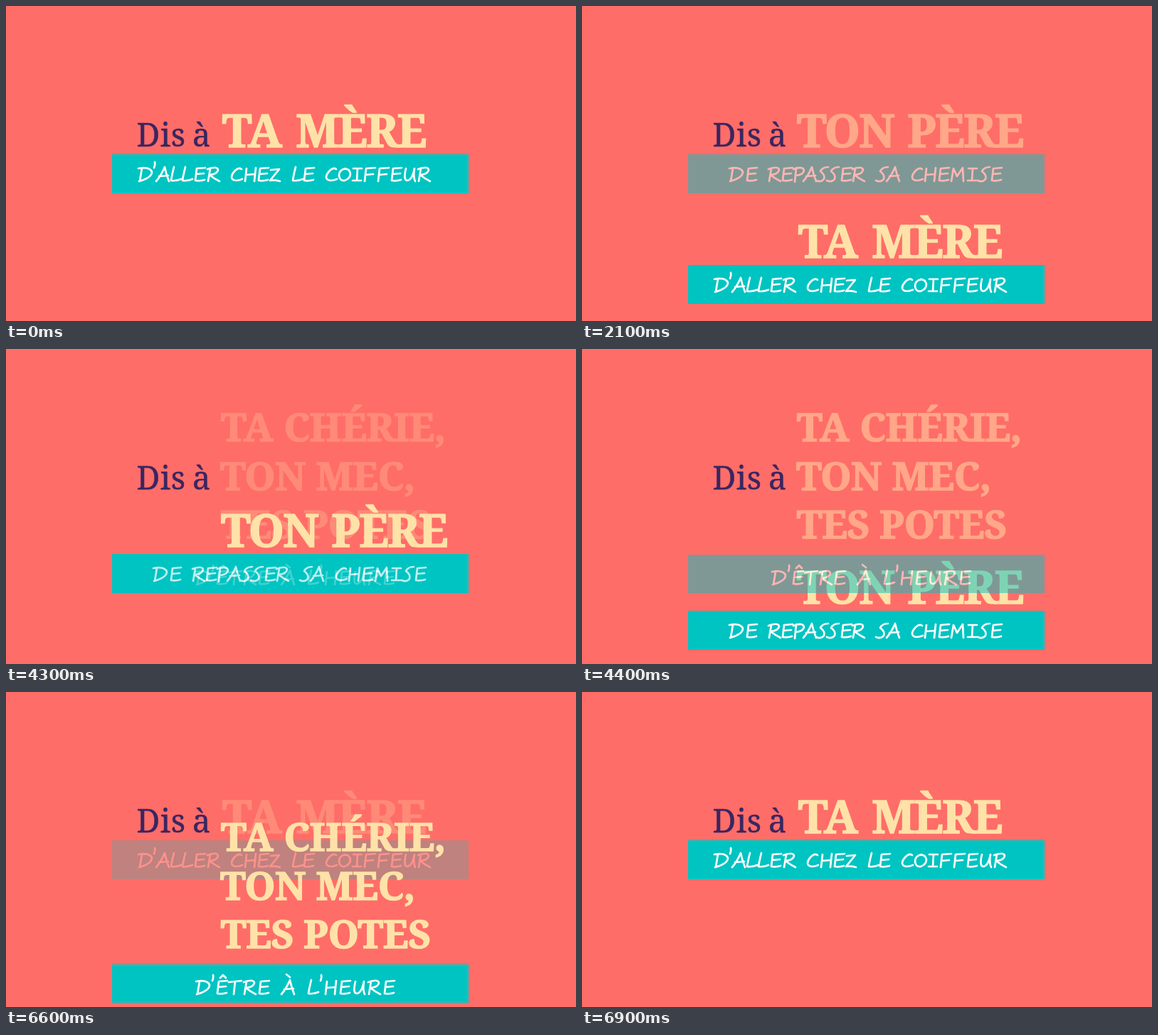
Recreate the animation shown at these times as an HTML page without scripts. Size 801 by 444 pixels, loop 7000 ms.

```html
<!DOCTYPE html>
<html lang="fr">
<head>
<meta charset="utf-8">
<title>Dis à…</title>
<style>
  html, body { margin: 0; width: 100%; height: 100%; overflow: hidden; background: #ff6d68; }
  svg { display: block; width: 801px; height: 444px; }
  text { font-family: "Noto Serif", serif; text-anchor: middle; }
  .lead { font-size: 45px; letter-spacing: .6px; fill: #3a2660; stroke: #3a2660; stroke-width: .5px; }
  .who { font-weight: 700; fill: #ffe2a8; stroke: #ffe2a8; stroke-width: 1.5px; }
  .big { font-size: 64px; letter-spacing: -1.8px; }
  .mid { font-size: 55px; letter-spacing: -.5px; }
  .band { fill: #00c4c2; }
  .hand { fill: none; stroke: #fff; stroke-width: 2.7px; stroke-linecap: round; stroke-linejoin: round; }

  /* each card fades in, holds, then drops off the stage in four steps */
  .card { animation: 7s step-end infinite; }
  #mother { --fall: 312px; animation-name: mother-fade, mother-drop; }
  #father { --fall: 320px; animation-name: father-fade, father-drop; }
  #friends { --fall: 376px; animation-name: friends-fade, friends-drop; }

  @keyframes mother-fade {
    0% { opacity: 1; }
    34.28% { opacity: 0; }
    94.28% { opacity: 0; animation-timing-function: steps(4, start); }
    100% { opacity: 1; }
  }
  @keyframes mother-drop {
    0% { transform: translateY(0); }
    28.57% { transform: translateY(0); animation-timing-function: steps(4, start); }
    34.28% { transform: translateY(var(--fall)); }
    34.3%, 100% { transform: translateY(0); }
  }
  @keyframes father-fade {
    0% { opacity: 0; }
    28.57% { opacity: 0; animation-timing-function: steps(4, start); }
    34.28% { opacity: 1; }
    67.14%, 100% { opacity: 0; }
  }
  @keyframes father-drop {
    0% { transform: translateY(0); }
    61.42% { transform: translateY(0); animation-timing-function: steps(4, start); }
    67.14% { transform: translateY(var(--fall)); }
    67.2%, 100% { transform: translateY(0); }
  }
  @keyframes friends-fade {
    0% { opacity: 0; }
    61.42% { opacity: 0; animation-timing-function: steps(4, start); }
    67.14%, 100% { opacity: 1; }
  }
  @keyframes friends-drop {
    0% { transform: translateY(0); }
    94.28% { transform: translateY(0); animation-timing-function: steps(4, start); }
    100% { transform: translateY(var(--fall)); }
  }
</style>
</head>
<body>
<svg viewBox="0 0 801 444" xmlns="http://www.w3.org/2000/svg">
  <defs>
    <!-- handwritten alphabet, baseline at 0 -->
    <path id="A" d="M0 0Q7-8 12-20Q14-10 18 0M4-7L17-8"/>
    <path id="C" d="M15-17Q11-20 5-14Q-1-7 2-3Q6 1 16-3"/>
    <path id="D" d="M5-18L2 0M0-18Q16-21 19-13Q19-5 1 0"/>
    <path id="E" d="M16-19L4-18L2-1Q9 0 15-2M3-10L14-11"/>
    <path id="F" d="M17-19L4-18L2 0M3-9L14-10"/>
    <path id="H" d="M3-18L1 0M16-19L14 0M2-9L15-10"/>
    <path id="I" d="M2-18L14-18M8-18L7-1M1-1L13-1"/>
    <path id="L" d="M5-20Q2-8 1-1Q8 0 15-3"/>
    <path id="M" d="M1 0L4-18L9-7L17-19L18 0"/>
    <path id="O" d="M10-18Q1-16 1-8Q2 0 9-1Q17-4 17-11Q15-19 7-17"/>
    <path id="P" d="M4-19L2 1M0-17Q14-22 15-15Q14-9 3-8"/>
    <path id="R" d="M4-18L1 0M0-17Q14-22 15-16Q14-10 3-9Q9-4 17 0"/>
    <path id="S" d="M16-20Q8-20 5-14Q12-9 10-3Q6 2-1-1"/>
    <path id="T" d="M0-17L18-19M9-18L7 0"/>
    <path id="U" d="M3-18Q-1-1 5-1Q12-2 15-18Q13-6 16 0"/>
    <path id="Z" d="M2-16L14-17L1-1Q8-2 15 0"/>
    <path id="apos" d="M3-27Q4-24 2-19"/>
    <path id="hat" d="M5-23L9-27L13-23"/>
    <path id="grave" d="M7-28L12-24"/>
  </defs>

  <rect width="801" height="444" fill="#ff6d68"/>
  <g class="lead"><text x="218" y="197.5">Dis</text><text x="275" y="197.5">à</text></g>

  <g class="card" id="mother">
    <g class="who big"><text x="345" y="198.5">TA</text><text x="498.5" y="198.5">MÈRE</text></g>
    <rect class="band" x="149" y="209" width="501" height="55"/>
    <g class="hand" transform="translate(0 247)" role="img" aria-label="D'aller chez le coiffeur">
      <use href="#D" x="186"/><use href="#apos" x="206"/><use href="#A" x="211"/><use href="#L" x="231"/><use href="#L" x="247"/><use href="#E" x="264"/><use href="#R" x="283"/>
      <use href="#C" x="316"/><use href="#H" x="335"/><use href="#E" x="353"/><use href="#Z" x="370"/>
      <use href="#L" x="402"/><use href="#E" x="417"/>
      <use href="#C" x="449"/><use href="#O" x="467"/><use href="#I" x="486"/><use href="#F" x="502"/><use href="#F" x="521"/><use href="#E" x="540"/><use href="#U" x="559"/><use href="#R" x="579"/>
    </g>
  </g>

  <g class="card" id="father">
    <g class="who big"><text x="370" y="198.5">TON</text><text x="538.5" y="198.5">PÈRE</text></g>
    <rect class="band" x="149" y="209" width="501" height="55"/>
    <g class="hand" transform="translate(0 247)" role="img" aria-label="De repasser sa chemise">
      <use href="#D" x="207"/><use href="#E" x="230"/>
      <use href="#R" x="262"/><use href="#E" x="280"/><use href="#P" x="297"/><use href="#A" x="311"/><use href="#S" x="330"/><use href="#S" x="345"/><use href="#E" x="363"/><use href="#R" x="380"/>
      <use href="#S" x="414"/><use href="#A" x="428"/>
      <use href="#C" x="463"/><use href="#H" x="481"/><use href="#E" x="500"/><use href="#M" x="518"/><use href="#I" x="541"/><use href="#S" x="557"/><use href="#E" x="574"/>
    </g>
  </g>

  <g class="card" id="friends">
    <g class="who mid">
      <text x="338.5" y="129.5">TA</text><text x="504" y="129.5">CHÉRIE,</text>
      <text x="361" y="198.5">TON</text><text x="505" y="198.5">MEC,</text>
      <text x="353" y="266.5">TES</text><text x="507.5" y="266.5">POTES</text>
    </g>
    <rect class="band" x="149" y="290" width="501" height="54"/>
    <g class="hand" transform="translate(0 332)" role="img" aria-label="D'être à l'heure">
      <use href="#D" x="267"/><use href="#apos" x="288"/><use href="#E" x="295"/><use href="#hat" x="296"/><use href="#T" x="313"/><use href="#R" x="334"/><use href="#E" x="354"/>
      <use href="#A" x="387"/><use href="#grave" x="387"/>
      <use href="#L" x="424"/><use href="#apos" x="440"/><use href="#H" x="448"/><use href="#E" x="468"/><use href="#U" x="488"/><use href="#R" x="509"/><use href="#E" x="530"/>
    </g>
  </g>
</svg>
</body>
</html>
```
